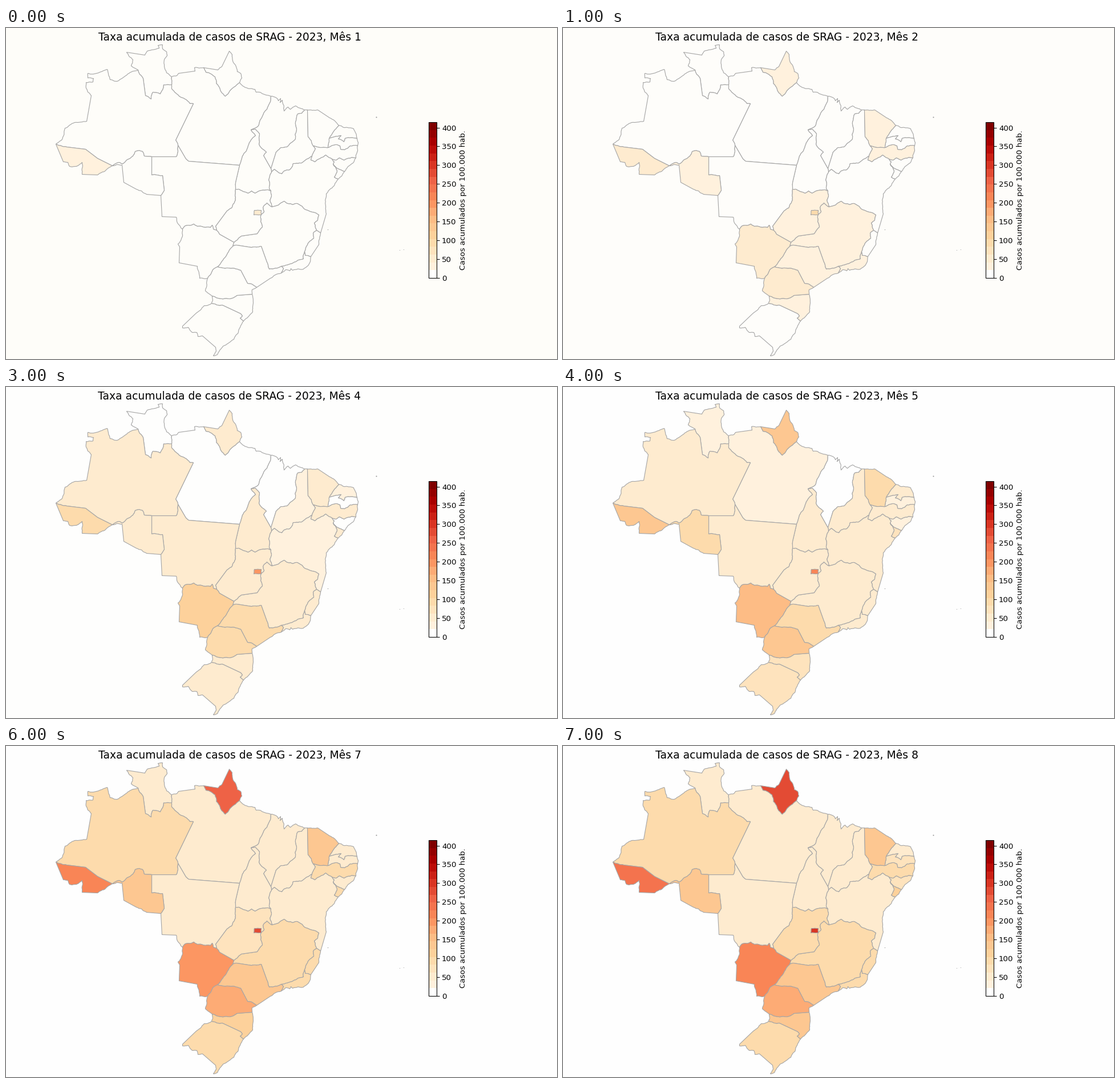
Animation, 966 px wide and 580 px high, one loop 8 s. Source, as a matplotlib script:

```python
import numpy as np
import matplotlib.pyplot as plt
from matplotlib.animation import FuncAnimation
from matplotlib.cm import ScalarMappable
from matplotlib.colors import ListedColormap, Normalize
from matplotlib.patches import Polygon

W, H, DPI = 966, 580, 96
MONTHS = 8
EDGE = "#a6a6a6"

plt.rcParams.update({"font.family": "DejaVu Sans", "font.size": 10.06})
rng = np.random.default_rng(7)
borders = []


def roughen(pts, amount=0.09, longest=25, shortest=3):
    """Midpoint displacement; long segments stay straight surveyed lines."""
    for _ in range(3):
        out = [pts[0]]
        for a, b in zip(pts, pts[1:]):
            d = b - a
            if shortest < np.hypot(*d) <= longest:
                shift = rng.uniform(-amount, amount)
                out.append((a + b) / 2 + shift * np.array([-d[1], d[0]]))
            out.append(b)
        pts = out
    return np.array(pts)


def border(states, *xy):
    """Line through a few key points, shared by the named states."""
    pts = list(np.array(xy, float).reshape(-1, 2))
    borders.append((states.split(), roughen(pts)))


def outline(state):
    """Chain all borders of one state into a ring."""
    left = [line for owners, line in borders if state in owners]
    ring = left.pop(0)
    while left:
        ends = [(np.hypot(*(line[k] - ring[-1])), i, k)
                for i, line in enumerate(left) for k in (0, -1)]
        _, i, k = min(ends)
        line = left.pop(i)
        ring = np.vstack([ring, line if k == 0 else line[::-1]])
    return ring


# North
border("AC AM", 87, 203, 106, 208, 139, 212, 160, 228, 186, 241)
border("AC", 186, 241, 172, 251, 160, 257, 133, 256, 133, 235, 123, 242,
       111, 242, 108, 235, 100, 234, 87, 203)
border("AM", 87, 203, 97, 196, 103, 175, 120, 165, 141, 163, 149, 118,
       140, 105, 140, 95, 152, 94, 153, 88, 143, 87, 143, 79, 158, 79,
       177, 72, 182, 90, 194, 93, 213, 80, 231, 73)
border("RR", 231, 73, 219, 66, 222, 55, 211, 42, 243, 47, 247, 40, 268, 35,
       266, 30, 274, 29, 274, 36, 281, 41, 282, 48, 277, 55, 281, 78, 290, 85)
border("RR PA", 290, 85, 290, 99)
border("RR AM", 290, 99, 276, 99, 270, 115, 257, 112, 254, 124, 244, 118,
       240, 88, 231, 73)
border("AM PA", 290, 99, 290, 106, 303, 119, 322, 132, 328, 132, 297, 196,
       301, 205)
border("AM MT", 301, 205, 298, 225, 255, 225)
border("AM RO", 255, 225, 242, 224, 239, 216, 233, 214, 226, 216, 222, 224,
       203, 238, 198, 235, 186, 241)
border("RO MT", 255, 225, 255, 257, 274, 258, 277, 284, 271, 293)
border("RO", 186, 241, 193, 239, 203, 240, 206, 270, 228, 282, 246, 291,
       271, 293)
border("PA", 290, 85, 299, 83, 302, 79, 331, 75, 330, 69, 346, 69)
border("PA AP", 346, 69, 350, 77, 366, 85, 375, 107, 384, 119, 391, 111,
       403, 100, 409, 95)
border("AP", 346, 69, 371, 73, 378, 67, 391, 40, 396, 46, 397, 57, 405, 76,
       411, 79, 413, 87, 409, 95)
border("PA", 409, 95, 420, 104, 436, 107, 438, 112, 445, 112, 464, 119)
border("PA MT", 301, 205, 315, 229, 320, 233, 409, 240)
border("PA TO", 409, 240, 414, 224, 424, 206, 437, 188, 429, 178)
border("PA MA", 429, 178, 442, 171, 445, 161, 457, 142, 464, 119)
border("TO MA", 429, 178, 437, 177, 444, 185, 443, 203, 456, 217, 451, 223,
       464, 246)
border("TO PI", 464, 246, 465, 252)
border("TO BA", 465, 252, 460, 266, 461, 281, 464, 285)
border("TO GO", 464, 285, 459, 283, 436, 289, 430, 285, 424, 289, 408, 282,
       402, 282)
border("TO MT", 402, 282, 402, 270, 409, 240)

# Northeast; the gulf is a zigzag of inlets
border("MA", 464, 119, 469, 120, 475, 123, 477, 127, 481, 123, 480, 130,
       484, 126, 487, 145, 494, 138, 498, 142, 507, 136, 523, 143)
border("MA PI", 523, 143, 518, 149, 511, 150, 507, 168, 509, 177, 507, 194,
       492, 208, 482, 209, 473, 217, 464, 246)
border("PI", 523, 143, 528, 143)
border("PI CE", 528, 143, 529, 190, 538, 206)
border("PI PE", 538, 206, 542, 211, 536, 224)
border("PI BA", 536, 224, 518, 236, 503, 237, 497, 248, 487, 250, 483, 255,
       470, 247, 465, 252)
border("CE", 528, 143, 546, 143, 567, 157, 583, 170)
border("CE RN", 583, 170, 578, 176, 566, 193)
border("CE PB", 566, 193, 564, 209)
border("CE PE", 538, 206, 550, 209, 564, 209)
border("RN", 583, 170, 592, 174, 609, 176, 615, 193)
border("RN PB", 566, 193, 587, 188, 582, 194, 592, 199, 594, 193, 615, 193)
border("PB", 615, 193, 617, 200, 616, 206)
border("PB PE", 564, 209, 577, 204, 585, 206, 586, 212, 593, 213, 603, 206,
       616, 206)
border("PE", 616, 206, 616, 215, 613, 227)
border("PE AL", 613, 227, 606, 226, 592, 231, 584, 227, 578, 231, 571, 229)
border("PE BA", 536, 224, 534, 231, 541, 234, 548, 229, 560, 222, 571, 229)
border("AL", 613, 227, 608, 236, 593, 251)
border("AL SE", 593, 251, 573, 238)
border("AL BA", 571, 229, 575, 234, 573, 238)
border("SE BA", 573, 238, 580, 250, 575, 261, 582, 264)
border("SE", 593, 251, 582, 264)
border("BA", 582, 264, 571, 280, 561, 290, 560, 312, 561, 325, 551, 359)

# Centre, southeast, south
border("BA GO", 464, 285, 465, 293, 462, 301, 466, 313)
border("BA MG", 466, 313, 487, 303, 502, 309, 510, 307, 525, 318, 548, 327,
       546, 336, 540, 341, 544, 354)
border("BA ES", 544, 354, 551, 359)
border("MT", 271, 293, 273, 330, 298, 331, 299, 338, 309, 352)
border("MT MS", 309, 352, 314, 346, 329, 343, 335, 347, 358, 349, 361, 345,
       363, 352, 369, 354)
border("MT GO", 369, 354, 367, 347, 387, 320, 395, 315, 402, 296, 402, 282)
border("MS GO", 369, 354, 374, 361, 399, 375)
border("MS MG", 399, 375, 397, 382)
border("MS SP", 397, 382, 383, 402, 370, 418)
border("MS PR", 370, 418, 362, 423, 353, 438)
border("MS", 353, 438, 339, 438, 335, 417, 303, 411, 304, 383, 301, 378,
       306, 372, 309, 352)
border("GO MG", 399, 375, 412, 364, 440, 360, 449, 348, 446, 339, 447, 326,
       452, 321, 450, 314, 457, 306, 466, 313)
border("DF", 435, 319, 447, 319, 447, 327, 434, 327, 435, 319)
border("MG ES", 544, 354, 538, 359, 539, 368, 532, 373, 523, 391)
border("MG RJ", 523, 391, 521, 404, 503, 411, 482, 417)
border("MG SP", 482, 417, 461, 422, 457, 410, 447, 382, 430, 384, 404, 380,
       397, 382)
border("ES RJ", 523, 391, 524, 398, 534, 400)
border("ES", 551, 359, 548, 379, 534, 400)
border("RJ", 534, 400, 532, 411, 521, 422, 502, 424, 499, 421, 497, 425,
       490, 423, 487, 426, 482, 429)
border("RJ SP", 482, 417, 486, 421, 482, 429)
border("SP", 482, 429, 463, 438, 439, 454)
border("SP PR", 370, 418, 388, 420, 411, 424, 423, 447, 430, 448, 439, 454)
border("PR", 353, 438, 349, 460, 361, 469)
border("PR", 439, 454, 431, 458, 431, 466)
border("PR SC", 361, 469, 368, 472, 392, 474, 405, 468, 431, 466)
border("SC", 361, 469, 362, 476, 360, 482)
border("SC", 431, 466, 433, 481, 432, 497, 416, 513)
border("SC RS", 360, 482, 379, 485, 411, 500, 414, 504, 410, 508, 416, 513)
border("RS", 416, 513, 406, 535, 399, 545, 380, 557, 370, 572, 363, 574,
       368, 566, 367, 559, 344, 539, 336, 540, 334, 533, 326, 533, 319, 524,
       309, 525, 309, 522, 332, 500, 347, 486, 360, 482)

levels = {}


def grow(states, *keys, first=0):
    """Colour class per month, eased between months 1, 3, 4, 6 and 8."""
    curve = np.interp(range(1, MONTHS + 1), [1, 3, 4, 6, 8], [first, *keys])
    for state in states.split():
        levels[state] = np.rint(curve).astype(int)


grow("RR PA", 0, 0, 2, 2)
grow("MA", 0, 0, 1, 2)
grow("PI RN BA", 0, 1, 2, 2)
grow("TO MT", 0, 2, 2, 2)
grow("AL PB", 0, 0, 2, 3)
grow("SE", 0, 2, 4, 5)
grow("AM ES", 1, 2, 3, 4)
grow("RS", 1, 2, 4, 4)
grow("MG RJ PE", 2, 2, 3, 4)
grow("GO", 2, 2, 2, 4)
grow("SC", 2, 2, 4, 6)
grow("RO CE", 2, 2, 5, 6)
grow("SP", 2, 4, 5, 6)
grow("PR", 3, 4, 7, 8)
grow("MS", 3, 5, 8.2, 10)
grow("AP", 2, 2, 10, 13)
grow("AC", 2, 4, 8, 11, first=1)
grow("DF", 7, 9, 12, 14, first=2)

shades = plt.get_cmap("OrRd")(np.linspace(0, 1, 20))
shades[0] = 1
cmap = ListedColormap(shades)

fig = plt.figure(figsize=(W / DPI, H / DPI), dpi=DPI)
ax = fig.add_axes([0, 0, 1, 1])
ax.set(xlim=(-0.5, W - 0.5), ylim=(H - 0.5, -0.5))
ax.axis("off")

shapes = {state: ax.add_patch(Polygon(outline(state), ec=EDGE, lw=0.85,
                                      joinstyle="round"))
          for state in levels}
# The capital district lies inside its neighbour
shapes["DF"].set_zorder(2)

islets = np.array([(649, 156), (690, 389), (697, 388), (564, 353)])
ax.scatter(*islets.T, s=[2.2, 0.6, 0.6, 0.9], c="#8f8f8f", linewidths=0)

title = ax.text(391.5, 21, "", fontsize=14.09, ha="center", va="baseline")

cax = fig.add_axes([741 / W, 142 / H, 13.65 / W, 273 / H])
bar = fig.colorbar(ScalarMappable(Normalize(0, 414.5), cmap), cax=cax)
bar.set_ticks(range(0, 401, 50))
bar.set_label("Casos acumulados por 100.000 hab.")


def draw(month):
    tint = max(0, 1 - month / 4)
    paper = np.array([254, 254 - tint, 254 - 5 * tint]) / 255
    fig.set_facecolor(paper)
    title.set_text(f"Taxa acumulada de casos de SRAG - 2023, Mês {month + 1}")
    for state, shape in shapes.items():
        level = levels[state][month]
        shape.set_facecolor(shades[level] if level else paper)
    return [title, *shapes.values()]


anim = FuncAnimation(fig, draw, frames=MONTHS, interval=1000, repeat=True,
                     repeat_delay=0, blit=False)
plt.show()
```
